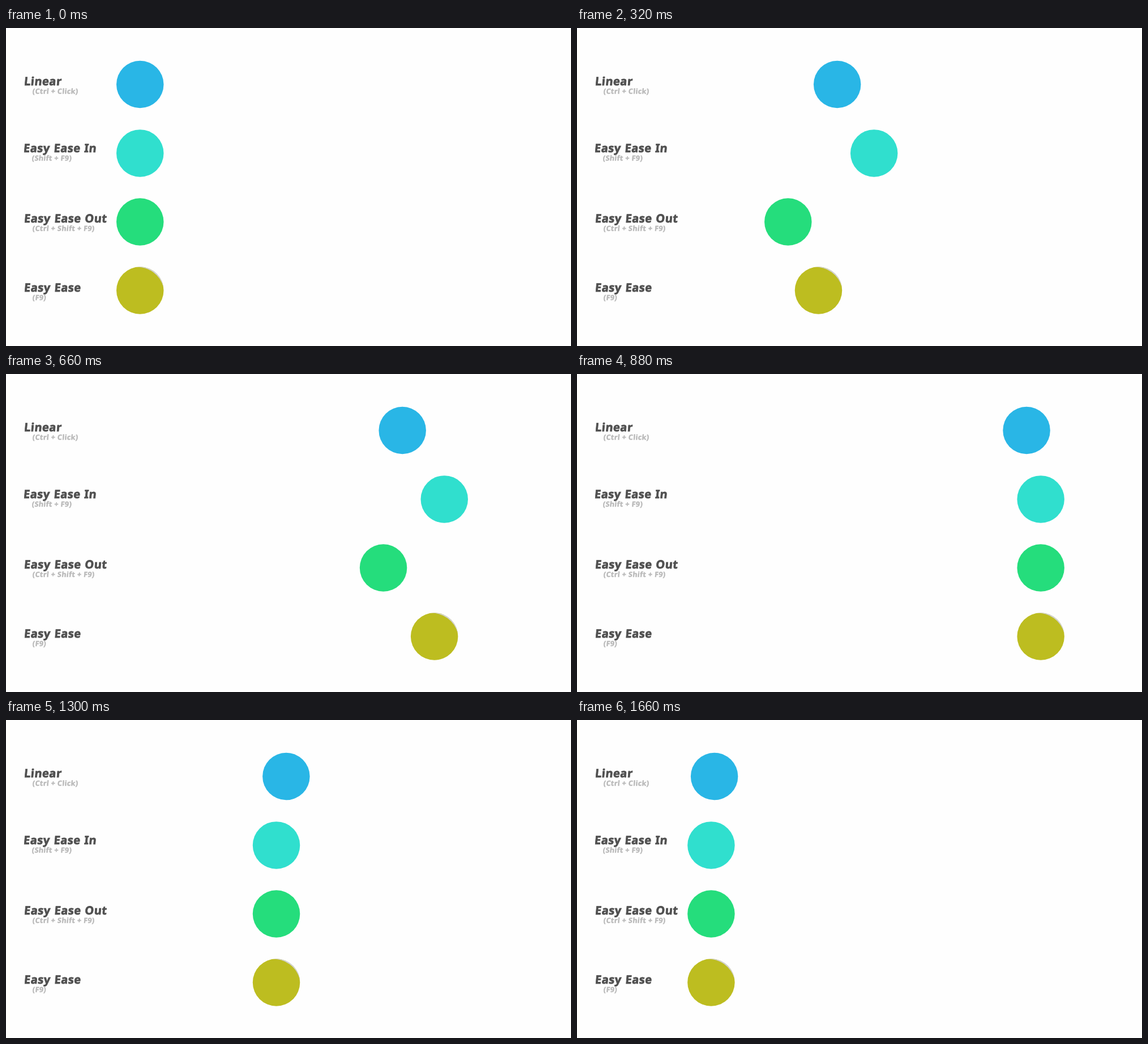
An HTML page that plays this animation: 998 by 561 pixels, repeating every 1680 ms.

```html
<!DOCTYPE html>
<html lang="en">
<head>
<meta charset="utf-8">
<title>Easing comparison</title>
<style>
  html, body { margin: 0; width: 100%; height: 100%; overflow: hidden; background: #fefefe; }
  svg { display: block; width: 998px; height: 561px; }
  text { font-family: "Noto Sans", "Open Sans", sans-serif; font-weight: 900; }
  .title { font-size: 20px; letter-spacing: 0.5px; word-spacing: 1.2px; fill: #505050; stroke: #505050; stroke-width: 0.8px; }
  .keys { font-size: 12.6px; letter-spacing: 0.38px; fill: #b9b9b9; stroke: #b9b9b9; stroke-width: 0.45px; }
</style>
</head>
<body>
<svg id="stage" viewBox="0 0 998 561"></svg>
<script>
const STEP = 20, STEPS = 84;        // display steps per loop, in ms
const HALF = 100, RATE = 2.4;       // motion ticks per sweep and per step
const LEFT = 236.75, RIGHT = 823.4, RADIUS = 41.75;

const linear = p => p;
const easy = p => p * p * (3 - 2 * p);

// Cubic Bezier (1/6, 1/6) to (2/3, 1), solved for x by bisection.
function easeIn(p) {
  const curve = (s, a, b) => 3 * (1 - s) ** 2 * s * a + 3 * (1 - s) * s * s * b + s ** 3;
  let lo = 0, hi = 1;
  for (let i = 0; i < 24; i++) {
    const mid = (lo + hi) / 2;
    if (curve(mid, 1 / 6, 2 / 3) < p) lo = mid; else hi = mid;
  }
  return curve(lo, 1 / 6, 1);
}
const easeOut = p => 1 - easeIn(1 - p);

const rows = [
  { title: "Linear", keys: "(Ctrl + Click)", x: 31.5, base: 101, y: 99.5, color: "#29b6e6", go: linear, back: linear },
  { title: "Easy Ease In", keys: "(Shift + F9)", x: 30.5, base: 219.3, y: 220.9, color: "#30dfce", go: easeIn, back: easy },
  { title: "Easy Ease Out", keys: "(Ctrl + Shift + F9)", x: 31.5, base: 343, y: 342, color: "#25dd7c", go: easeOut, back: easy },
  { title: "Easy Ease", keys: "(F9)", x: 31.5, base: 465.4, y: 463, color: "#bdbd20", go: easy, back: easy, rim: true }
];

const stage = document.getElementById("stage");

function add(parent, tag, attrs, text = "") {
  const el = document.createElementNS("http://www.w3.org/2000/svg", tag);
  for (const key in attrs) el.setAttribute(key, attrs[key]);
  el.textContent = text;
  return parent.appendChild(el);
}

function label(cls, x, y, text) {
  add(stage, "text", { class: cls, transform: `translate(${x} ${y}) skewX(-5)` }, text);
}

for (const row of rows) {
  label("title", row.x, row.base, row.title);
  label("keys", row.x + 15, row.base + 15, row.keys);
  row.ball = add(stage, "g", {});
  add(row.ball, "circle", { r: RADIUS, fill: row.color });
  // Pale crescent along the upper right edge.
  if (row.rim) {
    add(row.ball, "path", {
      d: `M-8 -41A${RADIUS} ${RADIUS} 0 0 1 41.4 -5.4A47 47 0 0 0 -8 -41Z`,
      fill: "#d2d2d2"
    });
  }
}

function draw(now) {
  const step = Math.floor(now / STEP + 1e-6) % STEPS;
  const tick = Math.floor(step * RATE + 1e-6);
  for (const row of rows) {
    const part = tick < HALF ? row.go(tick / HALF) : 1 - row.back(tick / HALF - 1);
    row.ball.setAttribute("transform", `translate(${LEFT + (RIGHT - LEFT) * part} ${row.y})`);
  }
}

const start = performance.now();
function loop() {
  draw(performance.now() - start);
  requestAnimationFrame(loop);
}
loop();
</script>
</body>
</html>
```
